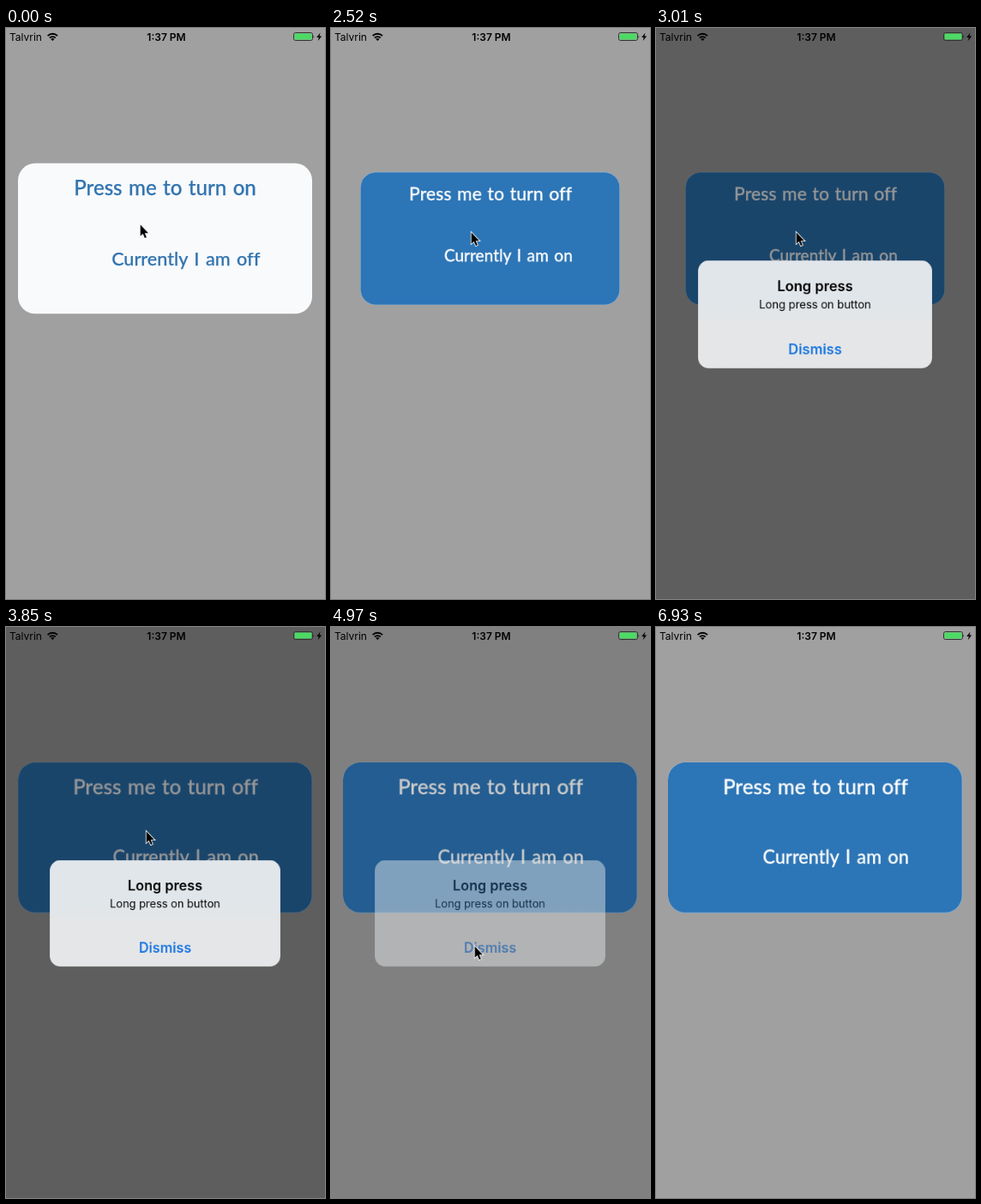
An HTML page for the animation above (7000 ms loop, 372 by 666 pixels).

```html
<!DOCTYPE html>
<html lang="en">
<head>
<meta charset="utf-8">
<title>Long press button</title>
<style>
  html, body { margin: 0; width: 100%; height: 100%; overflow: hidden; background: #a0a0a0; }
  svg { display: block; width: 100%; height: 100%; }
  text { font-family: Inter, "Liberation Sans", sans-serif; }
  .mid { text-anchor: middle; }
  .bold { font-weight: 600; }
  .button text {
    font-family: Lato, "Open Sans", sans-serif; font-weight: 500;
    font-variant-ligatures: none; stroke-width: .25px;
  }
  .title { font-size: 24.1px; word-spacing: 1.3px; }
  .state { font-size: 21.6px; word-spacing: 2px; }
  .off text { fill: #3274b0; stroke: #3274b0; }
  .on text { fill: #fff; stroke: #fff; }

  .button, .on, .dim, .alert, .pop, .cursor { animation: 7s linear infinite; }
  .button { animation-name: press; transform-origin: 185.5px 245.5px; }
  .on { animation-name: toggle; }
  .dim, .alert { animation-name: show; }
  .pop { animation-name: pop; transform-origin: 185.5px 334px; }
  .cursor { animation-name: wander; animation-timing-function: ease-in-out; }

  @keyframes press {
    0%, 14%, 30%, 55.5%, 100% { transform: scale(1); }
    16%, 32.5% { transform: scale(.881); }
    18%, 47% { transform: scale(.881); animation-timing-function: ease-in; }
    20%, 49% { transform: scale(1.003); animation-timing-function: ease-out; }
    21.6%, 50.6% { transform: scale(1.025); animation-timing-function: ease-in-out; }
    24.3%, 53.3% { transform: scale(.994); animation-timing-function: ease-in-out; }
    26.5% { transform: scale(1); }
  }
  @keyframes toggle {
    0%, 18% { opacity: 0; }
    18.6%, 100% { opacity: 1; }
  }
  @keyframes show {
    0%, 38.5% { opacity: 0; }
    42%, 68.5% { opacity: 1; }
    73.5%, 100% { opacity: 0; }
  }
  @keyframes pop {
    0%, 38.5% { transform: scale(1.2); animation-timing-function: ease-out; }
    44.3%, 100% { transform: scale(1); }
  }
  @keyframes wander {
    0%, 1% { transform: translate(156px, 229px); animation-timing-function: ease-in; }
    3.6% { transform: translate(195px, 193px); animation-timing-function: linear; }
    6% { transform: translate(222px, 225px); animation-timing-function: linear; }
    8.6% { transform: translate(190px, 254px); animation-timing-function: ease-out; }
    11%, 56.5% { transform: translate(163px, 238px); }
    63% { transform: translate(168px, 382px); }
    65.5%, 78% { transform: translate(167px, 372px); }
    82% { transform: translate(200px, 596px); }
    85% { transform: translate(333px, 330px); animation-timing-function: linear; }
    88% { transform: translate(262px, 255px); animation-timing-function: linear; }
    91% { transform: translate(150px, 100px); animation-timing-function: linear; }
    94%, 99.99% { transform: translate(137px, -30px); animation-timing-function: step-end; }
    100% { transform: translate(156px, 229px); }
  }
</style>
</head>
<body>
<svg viewBox="0 0 372 666" preserveAspectRatio="none">
  <defs>
    <linearGradient id="sheet" x2="0" y2="1">
      <stop offset=".4" stop-color="#e1e6ea"/>
      <stop offset=".6" stop-color="#e5e6e8"/>
    </linearGradient>
  </defs>
  <rect width="372" height="666" fill="#a0a0a0"/>

  <g class="button">
    <g class="off">
      <rect x="14" y="157.8" width="343" height="175.5" rx="20" fill="#f9fafc"/>
      <text class="title mid" x="185.5" y="195">Press me to turn on</text>
      <text class="state mid" x="209.7" y="276.5">Currently I am off</text>
    </g>
    <g class="on">
      <rect x="14" y="157.8" width="343" height="175.5" rx="20" fill="#2c75b6"/>
      <text class="title mid" x="186" y="195">Press me to turn off</text>
      <text class="state mid" x="209.7" y="276.5">Currently I am on</text>
    </g>
  </g>

  <g class="dim"><rect width="372" height="666" fill-opacity=".41"/></g>

  <g class="alert"><g class="pop">
    <rect x="51" y="272" width="269" height="124" rx="12.5" fill="url(#sheet)"/>
    <text class="mid bold" x="185.5" y="307" font-size="16.3">Long press</text>
    <text class="mid" x="185.5" y="327.5" font-size="12.8">Long press on button</text>
    <text class="mid bold" x="185.5" y="380" font-size="16.2" fill="#1b78e2">Dismiss</text>
  </g></g>

  <g class="status">
    <text x="4" y="14.5" font-size="12">Talvrin</text>
    <g fill="none" stroke="#000" stroke-width="1.9">
      <path d="M48.6 9.1a8.2 8.2 0 0 1 11.4 0"/>
      <path d="M50.9 11.5a5 5 0 0 1 6.8 0"/>
    </g>
    <path d="M52.2 13a3 3 0 0 1 4.2 0l-2.1 2.1z"/>
    <text class="mid bold" x="187" y="14.5" font-size="12">1:37 PM</text>
    <rect x="335.5" y="5.5" width="22" height="9" rx="2" fill="none" stroke="#333"/>
    <rect x="336.5" y="6.5" width="20" height="7" rx="1" fill="#4cd964"/>
    <path d="M358.5 8.5q1.6 1.7 0 3.4z" fill="#222"/>
    <path d="M366.5 5.5l-4.3 5.4h2.6l-1 4.1 4.4-5.5h-2.7z"/>
  </g>

  <g class="cursor">
    <path transform="translate(.7 .5) scale(.9)" d="M0 0V14.6L3.3 11.5 5.8 17.2 8 16.2 5.6 10.7H10.3Z" stroke="#fff" stroke-width="1.8" paint-order="stroke"/>
  </g>
</svg>
</body>
</html>
```
